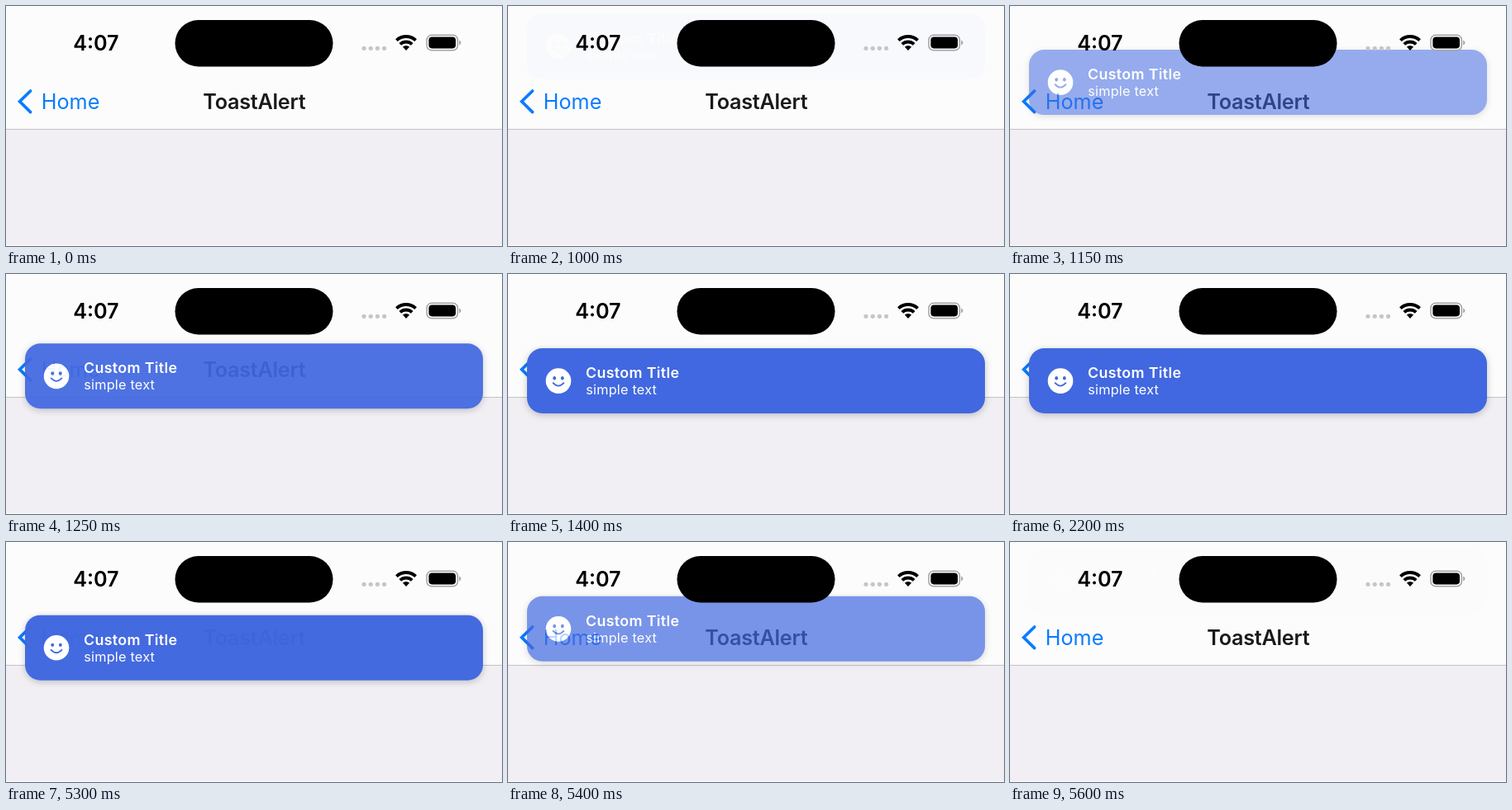
An HTML page for the animation above (5.8 s loop, 600 px wide and 291 px high).

```html
<!DOCTYPE html>
<html lang="en">
<head>
<meta charset="utf-8">
<title>Toast</title>
<style>
  html, body { margin: 0; width: 100%; height: 100%; overflow: hidden; background: #fcfcfc; }
  svg { display: block; width: 100%; height: 100%; }
  text { font-family: Inter, Roboto, sans-serif; font-optical-sizing: none; font-size: 25.2px; }
  .bold { font-weight: 600; }
  .link { fill: #0a7cff; }
  .toast {
    --t: 0;
    animation: toast 5800ms calc(var(--t) * -1ms) infinite paused;
  }
  .toast .card { fill: #4168e0; filter: drop-shadow(0 2px 4px rgba(0, 0, 0, .22)); }
  .toast text { fill: #fff; }
  .toast .head { font-size: 17.8px; letter-spacing: .35px; }
  .toast .body { font-size: 16.3px; letter-spacing: .2px; }
  /* in 965-1315 ms, out 5268-5618 ms */
  @keyframes toast {
    0%, 16.638% { opacity: 0; transform: translateY(-82px); animation-timing-function: ease-in-out; }
    22.672%, 90.828% { opacity: 1; transform: none; animation-timing-function: ease-in-out; }
    96.862%, 100% { opacity: 0; transform: translateY(-82px); }
  }
</style>
</head>
<body>
<svg viewBox="0 0 600 291">
  <rect width="600" height="291" fill="#fcfcfc"/>
  <rect y="150" width="600" height="140" fill="#f1eff4"/>
  <rect y="149" width="600" height="1" fill="#c3c2c5"/>

  <g class="nav">
    <path d="M29.6 103 16.6 115.8 29.6 128.6" fill="none" stroke="#0a7cff" stroke-width="3.7" stroke-linecap="round"/>
    <text class="link" x="42.8" y="125">Home</text>
    <text class="bold" x="300.3" y="125" text-anchor="middle" letter-spacing="-.25" fill="#1a1a1a">ToastAlert</text>
  </g>

  <g class="toast" id="toast">
    <rect class="card" x="23" y="90" width="554" height="79" rx="18.5"/>
    <circle cx="61" cy="129.6" r="15.3" fill="#fff"/>
    <g fill="#4168e0">
      <ellipse cx="56.2" cy="126.2" rx="1.9" ry="2.2"/>
      <ellipse cx="65.8" cy="126.2" rx="1.9" ry="2.2"/>
    </g>
    <path d="M54.6 132.2Q61 139 67.4 132.2" fill="none" stroke="#4168e0" stroke-width="1.9" stroke-linecap="round"/>
    <text class="head bold" x="94" y="126">Custom Title</text>
    <text class="body" x="94.3" y="146">simple text</text>
  </g>

  <g class="status">
    <text class="bold" x="81.2" y="54">4:07</text>
    <rect x="204.5" y="17" width="191" height="56.5" rx="28.2"/>
    <g fill="#c6c6c8">
      <circle cx="433" cy="51.3" r="2.6"/>
      <circle cx="441.2" cy="51.3" r="2.6"/>
      <circle cx="449.4" cy="51.3" r="2.6"/>
      <circle cx="457.6" cy="51.3" r="2.6"/>
    </g>
    <g fill="none" stroke="#000" stroke-width="3.9">
      <path d="M472.4 41.6A17 17 0 0 1 495.6 41.6"/>
      <path d="M476.8 46.3A10.5 10.5 0 0 1 491.2 46.3"/>
    </g>
    <path d="M484 54 479.9 49.6A6 6 0 0 1 488.1 49.6Z"/>
    <rect x="509" y="35.3" width="37.4" height="18.4" rx="5.8" fill="none" stroke="#a4a4a6" stroke-width="1.5"/>
    <rect x="511.4" y="37.6" width="32.6" height="13.8" rx="3.8"/>
    <path d="M548.2 41.4Q550.4 42.4 550.4 44.5T548.2 47.6Z" fill="#a4a4a6"/>
  </g>
</svg>
<script>
  const LOOP = 5800, STEP = 50;
  const toast = document.getElementById('toast');
  const start = performance.now();

  // The picture advances in 50 ms steps.
  function draw() {
    const t = (performance.now() - start) % LOOP;
    toast.style.setProperty('--t', Math.floor(t / STEP) * STEP);
    requestAnimationFrame(draw);
  }
  draw();
</script>
</body>
</html>
```
